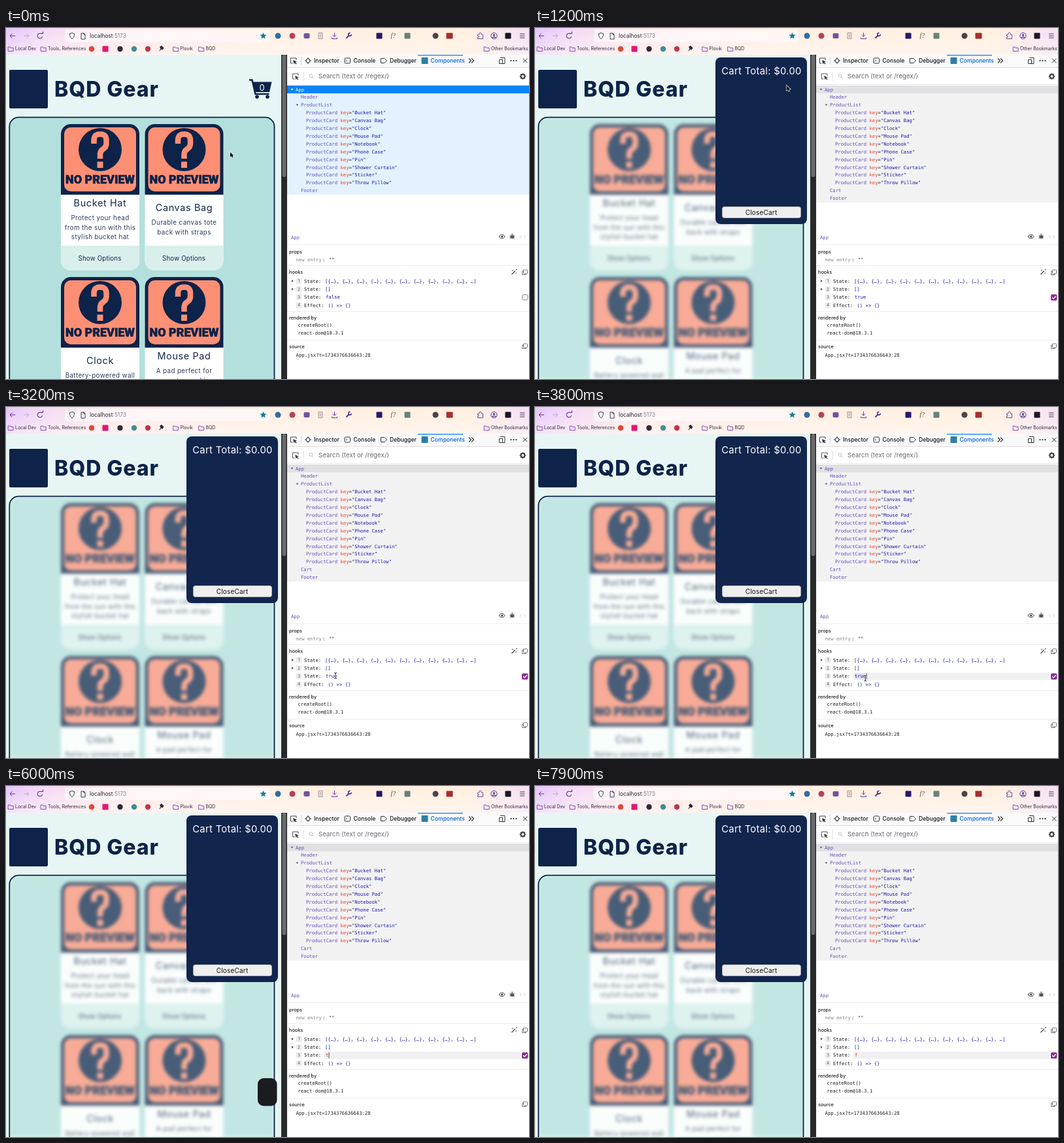
Animation of 800x537 px, one loop 8 s. Source, as an HTML page with a canvas:

```html
<!DOCTYPE html>
<html lang="en">
<head>
<meta charset="utf-8">
<title>Shop page with component inspector</title>
<style>
  html, body { margin: 0; width: 100%; height: 100%; overflow: hidden; background: #fff; }
  canvas { display: block; }
</style>
</head>
<body>
<canvas id="stage" width="800" height="537"></canvas>
<script>
const W = 800, H = 537, LOOP = 8000;
const NAVY = '#0d2349', SALMON = '#fd8f74', MINT = '#b3e0dc', PALE = '#e7f6f4';
const PURPLE = '#6a4fb5', BLUE = '#1a1aa6', INK = '#2b2340';
const SANS = 'Inter, Roboto, sans-serif', MONO = '"DejaVu Sans Mono", monospace';
const OPEN_AT = 1150, FOCUS_AT = 3500;

const stage = document.getElementById('stage').getContext('2d');
let c = stage;

function layer(draw) {
  const el = document.createElement('canvas');
  el.width = W; el.height = H;
  const before = c;
  c = el.getContext('2d');
  draw();
  c = before;
  return el;
}

function rect(x, y, w, h, color) { c.fillStyle = color; c.fillRect(x, y, w, h); }
function round(x, y, w, h, r, color, line, width = 1) {
  c.beginPath(); c.roundRect(x, y, w, h, r);
  if (color) { c.fillStyle = color; c.fill(); }
  if (line) { c.strokeStyle = line; c.lineWidth = width; c.stroke(); }
}
function disc(x, y, r, color) {
  c.beginPath(); c.arc(x, y, r, 0, 7); c.fillStyle = color; c.fill();
}
function ring(x, y, r, color, width = 1, from = 0, to = 7) {
  c.beginPath(); c.arc(x, y, r, from, to);
  c.strokeStyle = color; c.lineWidth = width; c.stroke();
}
function path(d, color, width = 1, fill = false) {
  const p = new Path2D(d);
  if (fill) { c.fillStyle = color; c.fill(p); }
  else { c.strokeStyle = color; c.lineWidth = width; c.stroke(p); }
}
function at(x, y, draw) { c.save(); c.translate(x, y); draw(); c.restore(); }
// y is the vertical middle of the capitals; gap is letter spacing in em
function text(s, x, y, size, color, o = {}) {
  c.font = `${o.weight || 400} ${size}px ${o.font || SANS}`;
  c.letterSpacing = `${(o.gap || 0) * size}px`;
  c.textAlign = o.align || 'left';
  c.textBaseline = 'alphabetic';
  c.fillStyle = color;
  c.fillText(s, x, y + size * 0.35);
  c.letterSpacing = '0px';
}
const mono = (s, x, y, color, size = 7.25) => text(s, x, y, size, color, { font: MONO });
const mid = (s, x, y, size, color, gap = 0) => text(s, x, y, size, color, { align: 'center', gap });

// ---------- browser bars ----------
function folder(x, y) {
  path(`M${x - 4} ${y - 3}h3l1 1.5h4v5h-8z`, '#7a35b8', 0.9);
}

function browserBars() {
  let g = c.createLinearGradient(0, 0, W, 60);
  [[0, '#e3c4fa'], [0.07, '#f3d9f6'], [0.18, '#fce5e8'], [0.45, '#ffeee2'], [0.88, '#ffefdf'], [1, '#f3def5']]
    .forEach(([p, k]) => g.addColorStop(p, k));
  rect(0, 0, W, 41, g);
  g = c.createLinearGradient(0, 0, 0, 41);
  g.addColorStop(0, 'rgba(255,250,248,0)');
  g.addColorStop(1, 'rgba(255,250,248,.55)');
  rect(0, 0, W, 41, g);
  round(90, 2.5, 313, 19, 4, 'rgba(255,250,252,.75)');

  path('M14 12H6m3.5-3.5L6 12l3.5 3.5', '#5d2c94');
  path('M27 12h8m-3.5-3.5L35 12l-3.5 3.5', '#c2a4cd');
  ring(52, 12, 3.8, '#5d2c94', 1.1, 0.2, 5.4);
  path('M53 8.5h3.5V5.5', '#5d2c94', 1.1);
  path('M101 7.5l3.5 1.2c0 4-1 6.3-3.5 8c-2.5-1.7-3.5-4-3.5-8z', INK, 0.9);
  path('M115 8h4l2 2v7h-6zm4 0v2h2', INK, 0.9);
  text('localhost', 128, 12, 8.3, '#25202c');
  text(':5173', 163.5, 12, 8.3, '#8a7f8d');
  at(393.5, 12, () => path('M0-5L1.5-1.7L5-1.4L2.3 1L3.2 4.5L0 2.6L-3.2 4.5L-2.3 1L-5-1.4L-1.5-1.7Z', '#147f8e', 1, true));

  disc(416, 12, 4.5, '#2d6ea5');
  disc(438, 12, 4.5, '#b5415c');
  round(455.5, 8, 9, 8, 2, '#7551a0');
  path('M478 7.5h6v9h-6zM479.5 10h3m-3 2h3m-3 2h3', '#8a7d80', 0.8);
  path('M502.5 7v6m-2.6-2.5l2.6 2.6l2.6-2.6M498.5 14.5v2h8v-2', '#6f35aa', 1);
  path('M520.5 15.5l4.5-4.5', '#55308c', 2);
  ring(526, 9.8, 2.3, '#55308c', 1.6, 0, 5);
  round(566.5, 7.5, 9, 9, 1, '#24186b');
  text('f?', 588.5, 12, 9.5, '#51474d', { font: '"Liberation Serif", serif', weight: 'italic 400' });
  round(609.5, 7.5, 9, 9, 1, '#67817a');
  disc(657, 12, 4.5, '#4e4149');
  round(673.5, 7.5, 10, 9, 1, '#a52e2b');
  path('M721.5 10h2.5v-1.5a1.5 1.5 0 0 1 3 0V10h2.5v6.5h-8v-2.3h1.5v-2h-1.5z', '#62418b', 0.9);
  ring(746.5, 12, 4.6, '#56318c');
  disc(746.5, 10.8, 1.6, '#56318c');
  path('M743.5 15.2q3-3 6 0', '#56318c', 1.3);
  round(763.5, 7.5, 9, 9, 1, '#1c1524');
  path('M786 9h7.5m-7.5 3h7.5m-7.5 3h7.5', '#49345e', 1);

  const label = (s, x) => { folder(x - 6.8, 32); text(s, x, 32, 6.9, '#30273a'); };
  label('Local Dev', 14);
  label('Tools, References', 64);
  disc(131, 32, 4.3, '#dc4b35');
  round(147.5, 27.5, 9, 9, 1, '#e21773');
  disc(174.5, 32, 4.2, '#302935');
  disc(196, 32, 4.2, '#3d8e91');
  disc(217, 32, 4.2, '#bf344c');
  path('M235 29l3-2l3.5 3.5l-2 3l-2-1l-2.5 3l-.5-.5l2-3.5z', '#27212b', 1, true);
  label('Plovik', 266.5);
  label('BQD', 305.5);
  label('Other Bookmarks', 742);
}

// ---------- shop page ----------
// the narrowest bold face gives the tallest lettering for the width
function poster(s, x, y, width) {
  c.textAlign = 'center';
  c.textBaseline = 'alphabetic';
  const [best] = ['Roboto', '"Open Sans"', '"DejaVu Sans"'].map(family => {
    const font = size => `extra-condensed 800 ${size}px ${family}, sans-serif`;
    c.font = font(20);
    return { font, size: 20 * width / c.measureText(s).width };
  }).sort((a, b) => b.size - a.size);
  const size = Math.min(26, best.size);
  c.font = best.font(size);
  c.fillStyle = c.strokeStyle = NAVY;
  c.lineWidth = 0.6;
  c.fillText(s, x, y + size * 0.36);
  c.strokeText(s, x, y + size * 0.36);
}

function noPreview(x, y) {
  round(x, y, 120, 108, [15, 15, 0, 0], NAVY);
  round(x + 5, y + 5, 110, 98, 10, SALMON);
  disc(x + 60, y + 39, 33, NAVY);
  at(x + 60, y + 39, () => {
    path('M-9.500-9V-14Q-9.500-23.500-1-23.500H1Q9.500-23.500 9.500-14V-9Q9.500-4 5-1Q0 2 0 7V14', SALMON, 8.5);
    rect(-4.5, 18.5, 9, 9.5, SALMON);
  });
  poster('NO PREVIEW', x + 60, y + 85, 106);
}

function card(x, y, title, titleY, lines) {
  round(x, y, 120, 224, 15, '#fff');
  noPreview(x, y);
  mid(title, x + 60, y + titleY, 14.4, '#14284b', 0.045);
  lines.forEach((s, i) => mid(s, x + 60, y + titleY + 23 + i * 14.3, 9.8, '#2b3d5b', 0.04));
  round(x, y + 186, 120, 38, [0, 0, 15, 15], '#d9efec');
  mid('Show Options', x + 59.5, y + 205.5, 9.7, '#14284b', 0.02);
}

function clipList() { c.beginPath(); c.roundRect(5, 136.5, 406, 430, 14); c.clip(); }

const list = layer(() => {
  clipList();
  rect(0, 130, 421, 407, MINT);
  card(84, 147, 'Bucket Hat', 121, ['Protect your head', 'from the sun with this', 'stylish bucket hat']);
  card(212.5, 147, 'Canvas Bag', 128, ['Durable canvas tote', 'back with straps']);
  card(84, 381, 'Clock', 128, ['Battery-powered wall', 'clock with hands']);
  card(212.5, 381, 'Mouse Pad', 121, ['A pad perfect for', 'computer working', 'all day long']);
});

function pageBase(blurred) {
  rect(0, 41, 421, 496, PALE);
  round(5, 64, 59, 59, 2, NAVY);
  text('BQD Gear', 74, 94, 32, NAVY, { weight: 800, gap: 0.03 });
  c.save();
  clipList();
  if (blurred) c.filter = 'blur(2.4px)';
  c.drawImage(list, 0, 0);
  c.filter = 'none';
  if (blurred) rect(0, 130, 421, 407, 'rgba(231,246,244,.27)');
  c.restore();
  round(5.3, 136.7, 405.2, 430, 14, null, NAVY, 1.8);
  rect(421, 41, 9, 496, '#29292b');
  round(422.5, 41, 6, 187, 3, '#6c6c6e');
}

function cartIcon(hover) {
  if (hover) round(367, 71, 44, 44, 10, MINT);
  path('M372 79.5h4.5l5 21.5h21', NAVY, 2.6);
  path('M378 82.5h28.5l-3.5 15.5h-21.5z', NAVY, 1, true);
  disc(384, 105.3, 2.8, NAVY);
  disc(400, 105.3, 2.8, NAVY);
  mid('0', 391.5, 91, 13, '#fff');
}

function cartPanel() {
  round(276, 45, 140, 255, 8, '#12254d');
  mid('Cart Total: $0.00', 346.5, 66, 14.8, '#fff', 0.02);
  round(286.5, 273.5, 120, 17, 3, '#efefef', '#a9abb2');
  mid('CloseCart', 346, 282, 10, '#111', 0.02);
}

// ---------- inspector ----------
function picker(x, y, color) {
  path(`M${x + 4} ${y - 1}v-3h-8.5v8h3`, color, 0.9);
  path(`M${x - 1} ${y - 1}l6 2.4l-2.4 1l2 2l-1 1l-2-2l-1 2z`, color, 1, true);
}
function copyIcon(x, y) {
  round(x - 2, y - 3.5, 6, 6, 1, null, '#555', 0.8);
  path(`M${x - 2} ${y - 1.5}h-1.8v5.5h5.5v-1.5`, '#555', 0.8);
}
function arrowDown(x, y, color) { path(`M${x - 2} ${y - 1.2}h4l-2 2.7z`, color, 1, true); }

function panelBase() {
  rect(430, 41, 370, 496, '#fff');
  rect(430, 41, 370, 19, '#f9f9fa');
  rect(430, 60, 370, 1, '#dedee2');
  rect(430, 86, 370, 1, '#e9e9ec');
  const tab = (s, x, color = '#18181c') => text(s, x, 50, 8.6, color, { weight: 450 });
  picker(440, 50, '#333');
  rect(451, 44, 1, 12, '#d6d6da');
  ring(462, 50, 3, '#333');
  path('M462 45v3m0 4v3m-5-5h3m4 0h3', '#333', 1);
  tab('Inspector', 471);
  round(518, 46, 8.5, 8, 1.5, null, '#333');
  path('M520 48.5l1.5 1.5l-1.5 1.5', '#333', 0.9);
  tab('Console', 531.5);
  path('M573.5 46.5h5.5l3.5 3.5l-3.5 3.5h-5.5z', '#333', 1);
  tab('Debugger', 587);
  rect(630, 41, 69, 1.3, '#0a84ff');
  round(635.5, 45, 10, 10, 1, '#2b7fa5');
  tab('Components', 649.5, '#0060df');
  path('M708 46.5l3.5 3.5l-3.5 3.5m4-7l3.5 3.5l-3.5 3.5', '#333', 1.1);
  path('M756 45.5h7v9h-4m-4.5-6h5v6h-5z', '#333', 1);
  [772.5, 776.5, 780.5].forEach(x => disc(x, 50, 1.1, '#222'));
  path('M791 46.8l6.5 6.5m0-6.5l-6.5 6.5', '#333', 1);

  picker(443, 74, '#444');
  rect(455, 67, 1, 14, '#e2e2e5');
  ring(466.5, 73, 2.3, '#b5b5b8', 0.9);
  path('M468 75l2.3 2.3', '#b5b5b8', 0.9);
  text('Search (text or /regex/)', 478, 74, 9.6, '#68686e', { gap: 0.01 });
  at(790.5, 74, () => {
    ring(0, 0, 2.9, '#444', 2);
    for (let i = 0; i < 8; i++) { c.rotate(Math.PI / 4); rect(-0.8, -4.8, 1.6, 2, '#444'); }
  });

  mono('App', 436, 320, PURPLE);
  path('M754 319q4.5-6 9.5 0q-5 6-9.5 0z', '#444', 1);
  disc(758.8, 319, 1.6, '#444');
  disc(774.3, 319.5, 2.7, '#555');
  path('M770.5 317l7.5 5m0-5l-7.5 5m0-2.5h7.5M772.5 315.5l3.5 0', '#555', 0.9);
  path('M788.5 317l-2 2.3l2 2.3m4-4.6l2 2.3l-2 2.3', '#bbb', 0.8);
  [331, 363, 433, 477].forEach(y => rect(430, y, 370, 1, '#ededf0'));

  const head = (s, y) => text(s, 433, y, 7.3, '#222', { weight: 500 });
  head('props', 342);
  mono('new entry', 443.5, 354, '#85858a');
  mono(':', 484, 354, '#222');
  mono('""', 494, 354, '#222');
  head('hooks', 373.5);
  path('M773.5 377l5.5-5.5m1.3-1.3l1.2-1.2', '#555', 1.4);
  path('M775 369.5v3m-1.5-1.5h3m3.5 3v2m-1-1h2', '#777', 0.7);
  copyIcon(793.5, 373.5);

  const items = '{…}, '.repeat(10);
  [['State:', `[${items}…]`], ['State:', '[]'], ['State:', ''], ['Effect:', '() => {}']].forEach(([name, value], i) => {
    const y = 387 + i * 12.4;
    if (i < 2) path(`M437 ${y - 2}l3 2l-3 2z`, '#555', 1, true);
    round(443.5, y - 4.5, 9, 9, 2, '#ebebee');
    mid(String(i + 1), 448, y, 6.5, '#666');
    mono(name, 456, y, '#1d1d20');
    mono(value, i === 3 ? 492.5 : 488, y, BLUE);
  });
  head('rendered by', 443);
  mono('createRoot()', 446.5, 454.5, '#222');
  mono('react-dom@18.3.1', 446.5, 466.5, '#222');
  head('source', 487);
  copyIcon(793.5, 486.5);
  mono('App.jsx?t=1734376636643:28', 443.5, 500, '#222', 7.3);
}

const PRODUCTS = ['Bucket Hat', 'Canvas Bag', 'Clock', 'Mouse Pad', 'Notebook', 'Phone Case',
  'Pin', 'Shower Curtain', 'Sticker', 'Throw Pillow'];

function tree(focused, open) {
  const rows = [['App', 443], ['Header', 451], ['ProductList', 451],
    ...PRODUCTS.map(p => ['ProductCard', 459, p]), ...(open ? [['Cart', 451]] : []), ['Footer', 451]];
  const step = 11.9;
  rect(430, 88, 370, rows.length * step + 0.5, focused ? '#e3f2fe' : '#f2f2f3');
  rect(430, 88, 370, 12, focused ? '#0a84f5' : '#e1e1e3');
  rows.forEach(([name, x, key], i) => {
    const y = 94 + i * step;
    const color = focused && !i ? '#fff' : PURPLE;
    if (i === 0 || i === 2) arrowDown(x - 5.5, y, focused && !i ? '#fff' : '#666');
    mono(name, x, y, color);
    if (!key) return;
    mono('key', x + 52.4, y, '#e3482c');
    mono('=', x + 65.5, y, '#333');
    mono(`"${key}"`, x + 69.9, y, BLUE);
  });
}

// ---------- timed parts ----------
const EDITS = [[FOCUS_AT, 'true'], [5400, 'tru'], [5600, 'tr'], [5800, 't'], [6200, ''], [7700, 'f']];

function stateRow(t, open) {
  const y = 411.8;
  const edit = EDITS.filter(e => t >= e[0]).pop();
  if (edit) rect(487, 406.5, 300, 11, '#f0f0f2');
  const value = edit ? edit[1] : open ? 'true' : 'false';
  if (value === 'true' && edit) rect(488.5, 407.5, 18, 9, '#e1e1f1');
  mono(value, 489, y, !edit || value === 'true' ? BLUE : '#e0342b');
  if (edit && (t - edit[0]) % 1000 < 500 && t < 7800) rect(489.3 + value.length * 4.36, 407.5, 0.8, 9, '#222');
  if (open) {
    round(789, 407.5, 9.5, 9.5, 2, '#8b2f95');
    path('M791.2 412.3l2 2l3.5-4', '#fff', 1.3);
  } else {
    round(790, 408, 8, 8, 1.5, '#fff', '#77777c', 1);
  }
}

const MOVES = [[0, 343, 190], [150, 343, 190], [800, 385, 88], [1200, 385, 88], [1900, 413, 388],
  [2100, 413, 388], [2800, 504, 411], [3700, 504, 411], [4500, 533, 500], [5400, 533, 500]];

function pointer(t) {
  const i = MOVES.findIndex(m => m[0] > t);
  if (i < 1) return null;
  const [t0, x0, y0] = MOVES[i - 1], [t1, x1, y1] = MOVES[i];
  const p = (t - t0) / (t1 - t0), e = p * p * (3 - 2 * p);
  return [x0 + (x1 - x0) * e, y0 + (y1 - y0) * e];
}

function drawPointer([x, y]) {
  at(x, y, () => {
    if (x > 487) {
      const beam = 'M-2-4.5q2 0 2 1.5v6q0 1.5-2 1.5m4-9q-2 0-2 1.5m0 6q0 1.5 2 1.5';
      path(beam, '#fff', 2);
      path(beam, '#111', 0.9);
    } else {
      const arrow = 'M0 0v7.5l1.7-1.6l1.3 2.7l1.4-.6l-1.2-2.6h2.3z';
      path(arrow, '#fff', 1.2);
      path(arrow, '#000', 1, true);
    }
  });
}

const scenes = [false, true].map(open => layer(() => {
  pageBase(open);
  panelBase();
  browserBars();
  if (open) cartPanel();
}));

function draw(t) {
  const open = t >= OPEN_AT, mouse = pointer(t);
  c.drawImage(scenes[+open], 0, 0);
  if (!open) cartIcon(mouse[0] > 367 && mouse[1] > 72 && mouse[1] < 115);
  tree(t < 950, open);
  stateRow(t, open);
  if (t >= 5850 && t < 7000) round(385, 447, 29.5, 42.5, 9, '#1c1c1e');
  if (mouse) drawPointer(mouse);
}

function frame(now) {
  draw(now % LOOP);
  requestAnimationFrame(frame);
}
draw(0);
requestAnimationFrame(frame);
</script>
</body>
</html>
```
